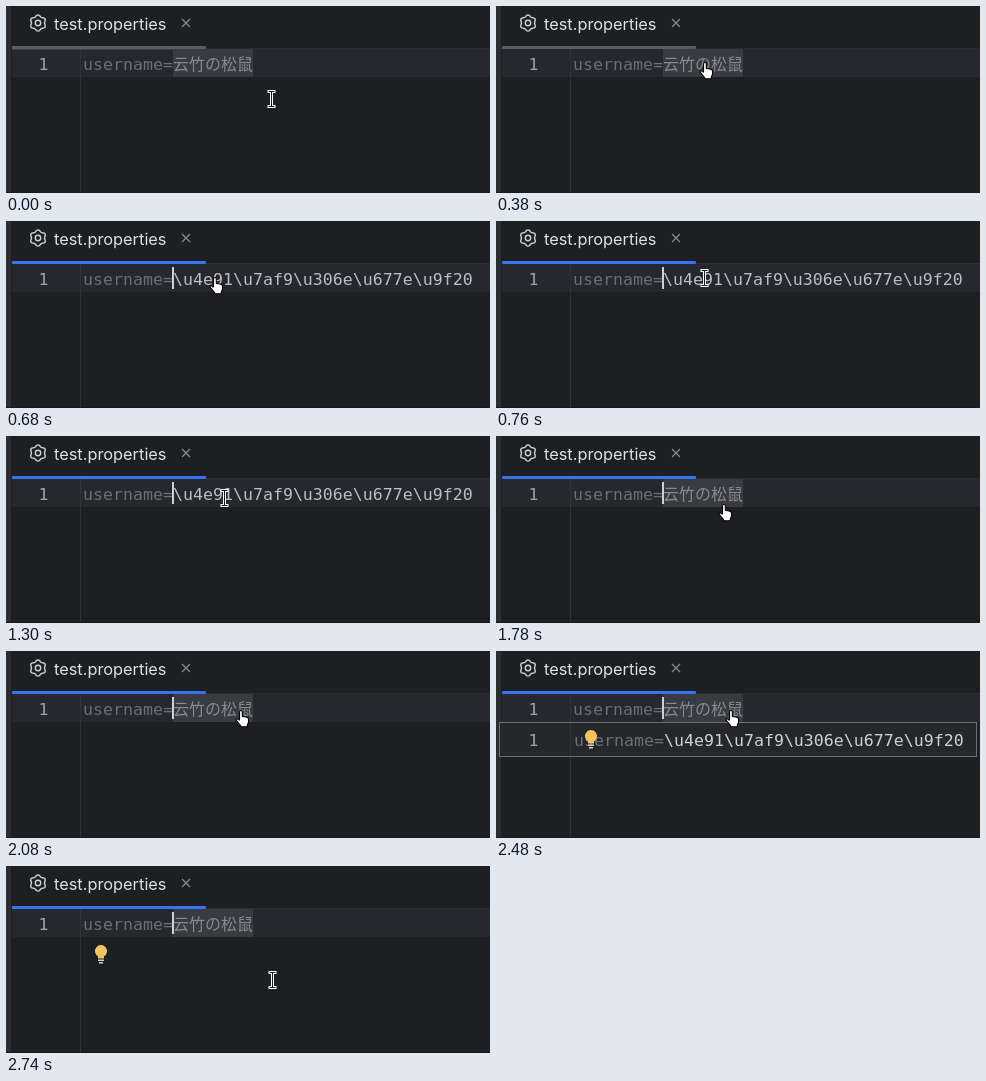
An HTML page for the animation above (2.8 s loop, 484 by 187 pixels).

```html
<!DOCTYPE html>
<html lang="en">
<head>
<meta charset="utf-8">
<title>Property folding</title>
<style>
  html, body { margin: 0; width: 100%; height: 100%; overflow: hidden; background: #1e1f22; }
  svg { display: block; }
  .tab { font: 16.35px Inter, sans-serif; fill: #dfe1e5; }
  .code { font: 16.6px "DejaVu Sans Mono", monospace; }
  .num { fill: #a1a3ab; }
  .key { fill: #6c6f76; }
  .esc { fill: #bcbec4; }
  .hint .esc { fill: #ced0d6; }
  .name { font: 300 16px "Noto Sans CJK SC", "Noto Sans CJK JP", "Noto Sans CJK", sans-serif; fill: #868a91; }
</style>
</head>
<body>
<svg width="484" height="187" viewBox="0 0 484 187">
  <rect width="484" height="187" fill="#1e1f22"/>
  <rect width="5" height="187" fill="#2b2d30"/>
  <rect x="5" y="42" width="479" height="1" fill="#2b2d30"/>
  <rect x="6" y="43" width="478" height="28" fill="#26282e"/>
  <rect x="74" y="43" width="1" height="143" fill="#313338"/>
  <rect y="186" width="484" height="1" fill="#1a191c"/>

  <g fill="none" stroke="#ced0d6" stroke-width="1.4">
    <path id="gear" transform="translate(32 17)"/>
    <circle cx="32" cy="17" r="2.7"/>
  </g>
  <text class="tab" x="48" y="24">test.properties</text>
  <path d="M176 13l8 8m0-8l-8 8" stroke="#868a91" stroke-width="1.2"/>
  <rect id="line" x="6" y="40" width="194" rx="1"/>

  <text class="code num" x="32.5" y="64">1</text>
  <text class="code key" x="77" y="64">username=</text>
  <g id="folded">
    <rect x="167" y="43" width="80" height="28" fill="#393b40"/>
    <text class="name" x="167" y="64">云竹の松鼠</text>
  </g>
  <text id="raw" class="code esc" x="167" y="64">\u4e91\u7af9\u306e\u677e\u9f20</text>
  <rect id="caret" x="166" y="46" width="2" height="22" fill="#ced0d6"/>

  <g id="hint" class="hint">
    <rect x="3.5" y="71.5" width="477" height="34" fill="#25272b" stroke="#6b6e74"/>
    <rect x="74" y="72" width="1" height="33" fill="#313338"/>
    <text class="code num" x="32.5" y="95">1</text>
    <text class="code key" x="78" y="95">username=</text>
    <text class="code esc" x="168" y="95">\u4e91\u7af9\u306e\u677e\u9f20</text>
  </g>
  <g id="bulb">
    <path d="M92 92.5v-2.2a6 6 0 1 1 6 0v2.2z" fill="#f2c55c"/>
    <path d="M92 94.2h6M93 96.8h4" stroke="#ced0d6" stroke-width="1.5"/>
  </g>

  <g id="beam" fill="none" stroke-linecap="square">
    <path d="M-2-7.5h5M.5-7.5v15M-2 7.5h5" stroke="#fff" stroke-width="3"/>
    <path d="M-2-7.5h5M.5-7.5v15M-2 7.5h5" stroke="#16171a"/>
  </g>
  <g id="hand">
    <path transform="scale(1.06)" fill="#fff" stroke="#000" stroke-linejoin="round"
      d="M4.3 9.3V1.7a1.3 1.3 0 0 1 2.6 0V6l1.8.3 1.7.4 1.5.6q.9.4.9 1.6v2.6l-1.2 2.6v1.7H5.3v-1.2L1 9.6Q.4 8.4 1.6 8.2q1 0 1.9 1.2z"/>
  </g>
</svg>
<script>
const LOOP = 2800, STEP = 80;
const el = id => document.getElementById(id);
const [line, folded, raw, caret, hint, bulb, beam, hand] =
  ["line", "folded", "raw", "caret", "hint", "bulb", "beam", "hand"].map(el);

let gear = "";
for (let i = 0; i < 72; i++) {
  const a = i * Math.PI / 36, r = 7.3 - 0.8 * Math.cos(6 * a);
  gear += (i ? "L" : "M") + (r * Math.cos(a)).toFixed(2) + " " + (r * Math.sin(a)).toFixed(2);
}
el("gear").setAttribute("d", gear + "z");

// Pointer: [time, shape, x, y]
const moves = [[0, beam, 265, 93], [70, hand, 203, 56], [760, beam, 208, 57]];

function glide(start, shape, x0, y0, x1, y1) {
  for (let i = 1; i <= 4; i++) {
    const k = i / 4;
    moves.push([start + (i - 1) * STEP, shape,
      Math.round(x0 + (x1 - x0) * k), Math.round(y0 + (y1 - y0) * k)]);
  }
}
glide(910, beam, 208, 57, 218, 62);
glide(1540, hand, 214, 62, 222, 68);
moves.push([2080, hand, 229, 59], [2680, beam, 257, 97], [2740, beam, 266, 114]);

const show = (node, on) => node.style.display = on ? "" : "none";

function draw(now) {
  const t = now % LOOP;
  const open = t >= 680 && t < 1380;
  show(raw, open);
  show(folded, !open);
  show(caret, t >= 680);
  show(hint, t >= 2140 && t < 2680);
  show(bulb, t >= 2480);
  line.setAttribute("fill", t < 680 ? "#5a5d63" : "#3574f0");
  line.setAttribute("height", t < 380 ? 3.5 : 3);

  const [, shape, x, y] = moves.filter(m => m[0] <= t).pop();
  show(beam, shape === beam);
  show(hand, shape === hand);
  shape.setAttribute("transform", `translate(${x} ${y})`);
}

const start = performance.now();
function tick() {
  draw(performance.now() - start);
  requestAnimationFrame(tick);
}
tick();
</script>
</body>
</html>
```
